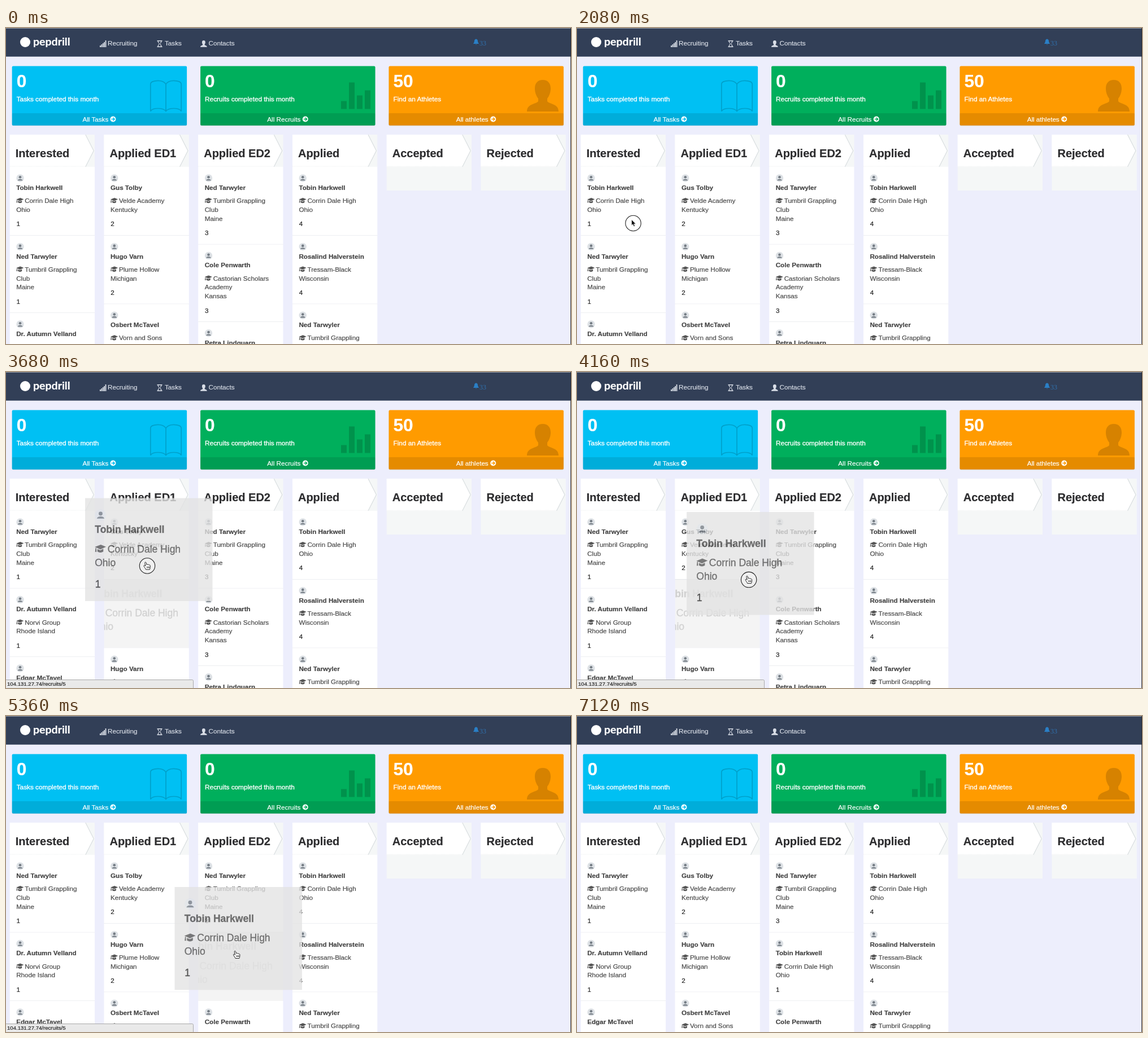
Write an HTML page that moves like this. It is 1000 px wide and 560 px high and loops after 7360 ms.

```html
<!DOCTYPE html>
<html lang="en">
<head>
<meta charset="utf-8">
<title>Recruiting board</title>
<style>
  html, body { margin: 0; width: 100%; height: 100%; overflow: hidden; background: #edeefc; }
  svg { display: block; }
  #stage { width: 100vw; height: 100vh; }
  text { font: 11.67px "Liberation Sans", Arial, sans-serif; color: #484848; fill: currentColor;
    stroke: currentColor; stroke-width: .2px; white-space: pre; }
  .name { font-weight: bold; color: #444; }
  .count { color: #222; }
  .title { font-size: 20px; font-weight: bold; color: #2d2d2f; }
  .nav { color: #d9dee7; }
  .brand { font: bold 19.5px Lato, sans-serif; color: #fff; }
  .bell { font: 12px "Liberation Serif", serif; color: #2f70ad; stroke: none; }
  .big { font-size: 31.67px; font-weight: bold; color: #fff; }
  .label { font-size: 11.8px; color: #fff; stroke-width: .35px; }
  .more { color: #fff; text-anchor: middle; }
  .url { font-size: 9.6px; color: #222; }
</style>
</head>
<body>
<svg id="stage" viewBox="0 0 1000 560">
  <g id="chrome"></g>
  <g id="board"></g>
  <g id="drag" opacity=".78"></g>
  <g id="status">
    <path d="M-1 545.5H329.500q2 0 2 2V561H-1z" fill="#e9e9e9" stroke="#aaa"/>
    <text class="url" x="2" y="556">104.131.27.74/recruits/5</text>
  </g>
  <path d="M999.500 0V560" stroke="#23262c" opacity=".9"/>
  <g id="cursor">
    <circle id="ring" r="13.700" fill="#fff" fill-opacity=".35" stroke="#222" stroke-width="1.100"/>
    <path id="arrow" d="M-3-6.500V4L-.6 1.800 1 5.700 3 4.900 1.400 1.200H4.600z" fill="#111" stroke="#fff" stroke-width=".7"/>
    <path id="hand" d="M-2.500 6.500C-3 4-6 2-6-.3-5.600-1.500-4-1-3 .4L-4.300-5C-4.500-6.900-2.500-7.200-2-5.500L-1-2C-.7-3.200.8-3 1.200-1.800 1.800-2.800 3-2.400 3.200-1.300 4-2 5.200-1.400 5.300-.3 5.600 2.500 5.300 4 4.300 6.500zM-.3 1.200V4M1.700 1.200V4M3.500 1.200V4" fill="#fff" stroke="#222" stroke-width="1"/>
  </g>
</svg>
<script>
const LOOP = 7360, TICK = 80;
const COL_W = 150.3, CARD_SCALE = 1.5;
const GRAB = { x: 110, y: 120 };
const el = id => document.getElementById(id);
const text = (x, y, cls, s) => `<text x="${x}" y="${y}" class="${cls}">${s}</text>`;
const rect = (x, y, w, h, fill, more = "") =>
  `<rect x="${x}" y="${y}" width="${w}" height="${h}" fill="${fill}" ${more}/>`;
const path = (d, attrs) => `<path d="${d}" ${attrs}/>`;
const at = (x, y, inner, scale = 1) =>
  `<g transform="translate(${x} ${y}) scale(${scale})">${inner}</g>`;
const bars = (x, base, w, gap, heights, fill) =>
  heights.map((h, i) => rect(x + i * gap, base - h, w, h, fill)).join("");

const PERSON = "M28 0C37 0 42 6 42 15C42 23 39 29 36 33V38C40 43 56 42 56 56H0C0 42 16 43 20 38V33C17 29 14 23 14 15C14 6 19 0 28 0z";
const BOOK = "M28 7C25 2 20 .8 14 .8C7 .8 .8 3 .8 7V55C3 51 8 50 14 50C20 50 25 51 28 55C31 51 36 50 42 50C48 50 53 51 55.200 55V7C55.200 3 49 .8 42 .8C36 .8 31 2 28 7V55";
const CAP = "M0 3.200L7 .5 13.200 3 6.500 6.200zM3 5.600V8.600Q6.500 11 10 8.600V5.400L6.500 7.200zM.8 4.300H1.700L2 9H.3z";
const HOURGLASS = "M0 0H9V1.500H8C8 4 6 5 5.500 6C6 7 8 8 8 10.500H9V12H0V10.500H1C1 8 3 7 3.500 6C3 5 1 4 1 1.500H0zM2.200 1.500C2.500 4 4 5 4.200 6C4 7.500 2.500 8 2.200 10.500H6.800C6.500 8 5 7.500 4.800 6C5 5 6.500 4 6.800 1.500z";
const BELL = "M5 0C8 .5 8 3 8.300 5.500L10 8.500H0L1.700 5.500C2 3 2 .5 5 0zM3.800 9.200H6.200Q5 11 3.800 9.200z";

const TILES = [
  { x: 10.7, fill: "#00c0f3", big: "0", label: "Tasks completed this month", more: "All Tasks", arrow: 24.5,
    icon: at(255, 92.5, path(BOOK, 'fill="none" stroke="#000" stroke-opacity=".17" stroke-width="1.700"')) },
  { x: 344.1, fill: "#00af5c", big: "0", label: "Recruits completed this month", more: "All Recruits", arrow: 31.5,
    icon: `<g opacity=".16">${bars(593, 143.5, 10, 14, [14, 47, 24, 33], "#000")}</g>` },
  { x: 677.5, fill: "#ff9b00", big: "50", label: "Find an Athletes", more: "All athletes", arrow: 30.5,
    icon: at(922, 92, path(PERSON, 'fill="#000" fill-opacity=".16"')) },
];

function tile({ x, fill, big, label, more, arrow, icon }) {
  const mid = x + 154.7;
  return rect(x, 68.3, 309.4, 105.2, "#000", 'fill-opacity=".1" rx="2"') +
    rect(x, 67.5, 309.4, 105.3, fill, 'rx="2"') + icon +
    rect(x, 151, 309.4, 21.8, "#000", 'fill-opacity=".1" rx="1"') +
    text(x + 8, 105, "big", big) + text(x + 8, 130, "label", label) +
    text(mid - 7, 165.5, "more", more) +
    at(mid + arrow - .5, 161.5, '<circle r="5" fill="#fff"/>' +
      path("M-3 0H2M0-2.800L2.800 0 0 2.800", `fill="none" stroke="${fill}" stroke-width="1.500"`));
}

const TITLES = ["Interested", "Applied ED1", "Applied ED2", "Applied", "Accepted", "Rejected"];
const colX = i => 6.7 + 166.75 * i;

function header(title, i) {
  const x = colX(i);
  return rect(x, 189, COL_W, i > 3 ? 99 : 57, "#f5f7f7") +
    at(x, 189, path("M0 0H134L148.500 28.500 134 57H0z", 'fill="#fff"') +
      path("M134 0L148.500 28.500 134 57", 'fill="none" stroke="#d9dee0" stroke-width="1.200"') +
      path("M0 56.200H134", 'stroke="#eceeee" stroke-dasharray="1 1"')) +
    text(x + 10, 229, "title", title);
}

function chrome() {
  const ink = "#d9dee7";
  return rect(0, 0, 1000, 50.7, "#323f57") + rect(0, 0, 1000, 1, "#b0b4ba", 'opacity=".8"') +
    '<circle cx="34" cy="25" r="9" fill="#fff"/>' + text(48, 31, "brand", "pepdrill") +
    bars(166, 34, 1.8, 2.4, [3, 5, 7, 9, 12], ink) +
    text(180, 31, "nav", "Recruiting") +
    at(267.5, 22, path(HOURGLASS, `fill="${ink}" fill-rule="evenodd"`)) +
    text(281, 31, "nav", "Tasks") +
    at(344, 22, path(PERSON, `fill="${ink}"`), .21) +
    text(358.5, 31, "nav", "Contacts") +
    at(827, 19.5, path(BELL, 'fill="#2a7fc6"')) + text(838, 31, "bell", "33") +
    TILES.map(tile).join("") + TITLES.map(header).join("");
}

const person = (count, name, ...lines) => ({ count, name, lines });
const tobin = n => person(n, "Tobin Harkwell", "Corrin Dale High", "Ohio");
const ned = n => person(n, "Ned Tarwyler", "Tumbril Grappling", "Club", "Maine");
const moved = tobin(1);
const COLUMNS = [
  [ned(1), person(1, "Dr. Autumn Velland", "Norvi Group", "Rhode Island"),
    person(1, "Edgar McTavel", "Norvi Group", "Ohio")],
  [person(2, "Gus Tolby", "Velde Academy", "Kentucky"),
    person(2, "Hugo Varn", "Plume Hollow", "Michigan"),
    person(2, "Osbert McTavel", "Vorn and Sons", "Iowa")],
  [ned(3), person(3, "Cole Penwarth", "Castorian Scholars", "Academy", "Kansas"),
    person(3, "Petra Lindquarn", "Norvi Group", "Ohio")],
  [tobin(4), person(4, "Rosalind Halverstein", "Tressam-Black", "Wisconsin"), ned(4)],
];
const cardHeight = c => 90 + 15.8 * c.lines.length;

function cardBody({ count, name, lines }) {
  return '<circle cx="18.300" cy="20" r="6.700" fill="#dde1e5"/>' +
    '<circle cx="18.300" cy="18.300" r="2.300" fill="#747c84"/>' +
    path("M14 24.200C14 20.800 22.600 20.800 22.600 24.200z", 'fill="#747c84"') +
    text(11.5, 41, "name", name) + at(11.5, 54.5, path(CAP, 'fill="#555"')) +
    lines.map((s, i) => text(i ? 11.5 : 26.5, 64.2 + 15.8 * i, "", s)).join("") +
    text(11.8, 73.8 + 15.8 * lines.length, "count", count);
}

function card(c, x, y) {
  const h = cardHeight(c);
  return at(x, y, rect(0, 0, COL_W, h, "#fff") + rect(0, h - .5, COL_W, 1, "#dfe2e6") + cardBody(c));
}

// The drop slot shows an enlarged, faded copy of the card, cropped to its box.
function slot(c, x, y) {
  const h = cardHeight(c), k = (1 - CARD_SCALE) / 2;
  return `<svg x="${x}" y="${y}" width="${COL_W}" height="${h}">${rect(0, 0, COL_W, h, "#f4f4f4")}
    <g opacity=".2">${at(COL_W * k, h * k, cardBody(c), CARD_SCALE)}</g></svg>`;
}

// Where the moved card sits: start time, column, row, and whether it is a drop slot.
const PLACES = [
  [0, 0, 0, false], [3440, 0, 0, true], [3600, 1, 1, true],
  [4320, 2, 1, true], [5440, 2, 1, false],
];

function board([, col, row, isSlot]) {
  return COLUMNS.map((cards, i) => {
    const list = cards.slice();
    if (i === col) list.splice(row, 0, moved);
    let y = 246;
    return list.map(c => {
      const draw = isSlot && c === moved ? slot : card;
      const out = draw(c, colX(i), y);
      y += cardHeight(c);
      return out;
    }).join("");
  }).join("");
}

// Pointer path: time, x, y.
const PATH = [
  [320, 310, -12], [640, 262, 112], [720, 262, 112], [1360, 99.5, 346],
  [2400, 99.5, 346], [2800, 75, 337], [3360, 75, 337], [3680, 250, 343.5],
  [3920, 250, 343.5], [4480, 387.5, 406], [4720, 387.5, 406], [5120, 408.5, 423],
  [6480, 408.5, 423], [6720, 452, 470], [6880, 452, 470], [7120, 530, 575],
];

function pointer(t) {
  const i = PATH.findIndex(p => p[0] > t);
  if (i < 1) return PATH[i < 0 ? PATH.length - 1 : 0].slice(1);
  const [t0, x0, y0] = PATH[i - 1], [t1, x1, y1] = PATH[i];
  const u = (t - t0) / (t1 - t0), k = u * u * (3 - 2 * u);
  return [x0 + (x1 - x0) * k, y0 + (y1 - y0) * k];
}

const show = (id, on) => { el(id).style.display = on ? "" : "none"; };
const within = (t, from, to) => t >= from && t < to;

el("chrome").innerHTML = chrome();
el("drag").innerHTML = `<g transform="scale(${CARD_SCALE})">` +
  rect(0, 0, COL_W, cardHeight(moved), "#e3e3e3") + cardBody(moved) + "</g>";

let lastPlace, lastTick;
function render(t) {
  const place = PLACES.filter(p => p[0] <= t).pop();
  if (place !== lastPlace) el("board").innerHTML = board(lastPlace = place);
  const [x, y] = pointer(t), onLink = within(t, 2640, 6960);
  show("cursor", within(t, 400, 7120));
  show("arrow", !onLink);
  show("hand", onLink);
  show("ring", within(t, 2080, 2160) || within(t, 3200, 5360));
  show("status", within(t, 2640, 7040));
  show("drag", within(t, 3440, 5440));
  el("cursor").setAttribute("transform", `translate(${x} ${y})`);
  el("drag").setAttribute("transform", `translate(${x - GRAB.x} ${y - GRAB.y})`);
}

const start = performance.now();
function frame() {
  const t = Math.floor((performance.now() - start) % LOOP / TICK) * TICK;
  if (t !== lastTick) render(lastTick = t);
  requestAnimationFrame(frame);
}
frame();
</script>
</body>
</html>
```
